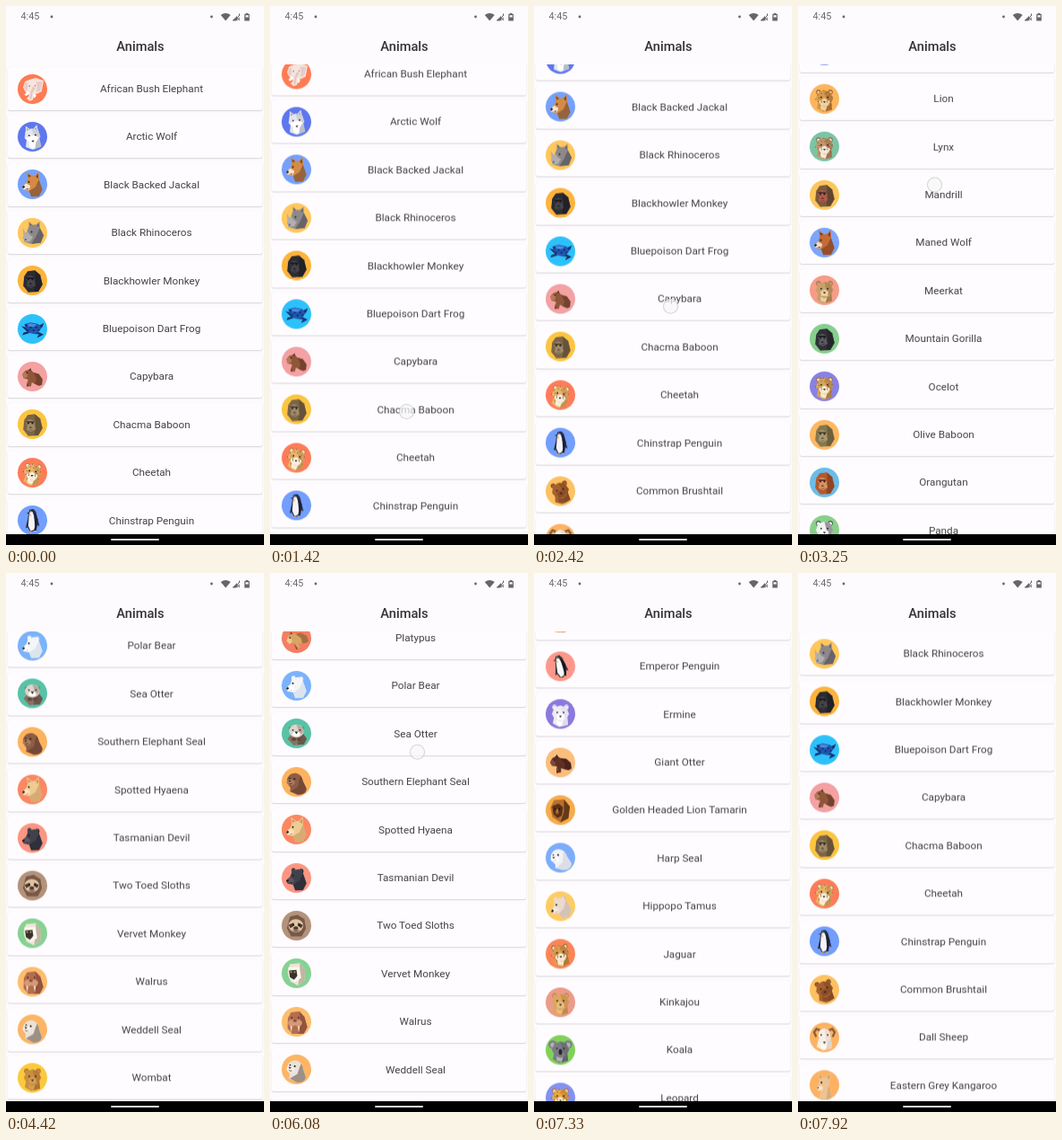
Recreate the animation shown at these times as an HTML page. Size 288 by 600 pixels, loop 8000 ms.

```html
<!DOCTYPE html>
<html lang="en">
<head>
<meta charset="utf-8">
<title>Animals</title>
<style>
html, body { margin: 0; width: 100%; height: 100%; overflow: hidden; background: #fdfbfe }
#stage { position: relative; width: 288px; height: 600px; overflow: hidden; font: 11.73px Roboto, sans-serif; color: #434346 }
#stage > * { position: absolute }
#clock { left: 16.5px; top: 4px; font-size: 10.8px; line-height: 16px; color: #6a696e }
#status { left: 0; top: 0 }
#title { left: 6px; width: 288px; top: 35px; line-height: 20px; text-align: center; font-size: 14.67px; font-weight: 500; color: #343338 }
#view { left: 0; top: 65px; width: 288px; height: 523px; overflow: hidden }
#list { position: absolute; left: 2px; top: 0; width: 284px; will-change: transform }
.card { position: absolute; width: 284px; height: 48px; border-radius: 2px; background: #fefcff; box-shadow: 0 1px 1.5px #00000026, 0 0 1px #00000018 }
.card svg { position: absolute; left: 11px; top: 7.5px; width: 33px; height: 33px; border-radius: 50% }
.card span { position: absolute; left: 37px; right: 0; line-height: 48px; text-align: center; white-space: nowrap }
#nav { left: 0; top: 588px; width: 288px; height: 12px; background: #000 }
#nav::after { content: ""; position: absolute; left: 117px; top: 5px; width: 54px; height: 2px; border-radius: 1px; background: #d8d8d8 }
#touch { left: -9px; top: -9px; width: 15px; height: 15px; border: 1.5px solid #c4c3c7b0; border-radius: 50%; background: #f8f8f8b8 }
</style>
</head>
<body>
<div id="stage">
  <div id="clock">4:45</div>
  <svg id="status" width="288" height="24" fill="#66656a">
    <circle cx="51" cy="12" r="1.4"/><circle cx="229.5" cy="12" r="1.4"/>
    <path d="M239.7 10Q245.2 5.8 250.7 10L245.2 16.6Z"/>
    <path d="M260.5 8.5V11M253 16H257L260 10.5M258.3 13L261 16M261 13L258.3 16" fill="none" stroke="#66656a"/>
    <path d="M253 16L258 11V16Z"/>
    <path d="M267.6 8h2.8v1h1.4v7.5h-5.6V9h1.4ZM267.4 10.2v2.3h3.2v-2.3Z" fill-rule="evenodd"/>
  </svg>
  <div id="title">Animals</div>
  <div id="view"><div id="list"></div></div>
  <div id="touch"></div>
  <div id="nav"></div>
</div>
<script>
const PITCH = 53.4, LOOP = 8000;

// name | shape | backdrop | fur | shade | light | tilt
const animals = `African Bush Elephant|elephant|ff7b53|f6e4de|d9b6ae|fff
Arctic Wolf|dog|5d77ee|e6e6ec|a9adbd|fff|-6
Black Backed Jackal|fox|75a1fb|d58a45|6d4a3a|f7e6d4
Black Rhinoceros|rhino|ffc75c|8d898b|676367|b3aeae
Blackhowler Monkey|ape|fdb33c|2b2b31|1c1c22|45444a
Bluepoison Dart Frog|frog|2dc1fb|1f56b0|16306b|4b8be0
Capybara|capybara|f4a1a3|8f5639|643a29|b57a55
Chacma Baboon|ape|fcc540|7b6547|57472f|a08a68
Cheetah|cat|ff7c59|e6b56c|b98348|fbeedd|8
Chinstrap Penguin|penguin|729efd|2b2f48|1d2036|f4f4f8
Common Brushtail|bear|fdc161|a5602e|71401f|8a4c28|-14
Dall Sheep|sheep|fdb263|f7efe6|dacbb9|fffaf2
Eastern Grey Kangaroo|roo|fdb263|ecc391|c79a68|f9e5c8
Emperor Penguin|penguin|fd978b|36343c|15151b|fafafa|-12
Ermine|bear|8a79de|f0ecf4|dcd6e6|fff
Giant Otter|capybara|fbbe7c|5e3024|3f1d17|7d4a38|-12
Golden Headed Lion Tamarin|tamarin|f6ac4b|5a3019|2c150b|b8702f
Harp Seal|seal|7cadfb|f1f2f5|cdd2dc|fff
Hippopo Tamus|profile|fdcc63|ead9cc|c9b4a8|f4e8dd|-14
Jaguar|cat|fb8559|daa04f|a26a2d|f8ead0|-8
Kinkajou|bear|ed9b89|dda760|b57e43|e8bd80
Koala|koala|80d159|7c7c84|5b5b64|b4b2ba
Leopard|cat|8391f2|e8a842|b9772a|fae7c4
Lion|cat|fdb65e|d49a4b|94582a|f1d29d
Lynx|cat|7bc4a4|c39468|8f6647|f6ead9
Mandrill|ape|fcc75a|7a5a3c|4f3a2b|b9584b
Maned Wolf|fox|7ba6fb|c46c38|7a3b24|f2dcc6
Meerkat|bear|f69c88|c9a06a|936d45|ead0a4
Mountain Gorilla|ape|86cf8c|303036|202026|5a5860
Ocelot|cat|8a82e2|d8a458|a36e35|f9ead0
Olive Baboon|ape|fdb860|86774f|5d5235|a99a70
Orangutan|ape|6bbce8|b5592c|7b371b|d79668
Panda|bear|89d08a|f2f2f2|2d2d33|fff
Patas Monkey|ape|fb8e66|c4743d|8b4c25|efd5bb
Pine Marten|bear|fcc75a|79492f|522e1f|efd49a
Platypus|capybara|f47d63|d9a562|8b5433|f2c991|-30
Polar Bear|profile|7bb2fc|f3f5f8|cdd9e6|fff
Sea Otter|otter|58c2a7|8a7160|5e4b41|ded5cb
Southern Elephant Seal|seal|fdb35e|8d5d45|643d30|ab7b5e|8
Spotted Hyaena|fox|fb8763|eecb92|c9965f|f9e2bb
Tasmanian Devil|profile|fc9583|41414c|25252f|5c5660
Two Toed Sloths|sloth|b3927b|785846|4f382d|dfc4a5
Vervet Monkey|vervet|86d293|ece5d7|b5ab97|fbf7ed
Walrus|walrus|fdbd6e|b46d4e|86493a|d49a78
Weddell Seal|seal|fdb565|eae2d8|6a5a52|f6efe7|14
Wombat|bear|fcc93c|c98e42|9b672d|d59f52`.split('\n').map(s => s.split('|'));

const path = (c, d, o = 1) => `<path fill="#${c}" opacity="${o}" d="${d}"/>`;
const oval = (c, x, y, rx, ry = rx) => `<ellipse fill="#${c}" cx="${x}" cy="${y}" rx="${rx}" ry="${ry}"/>`;
const pair = (c, x, y, rx, ry) => oval(c, -x, y, rx, ry) + oval(c, x, y, rx, ry);
const eyes = (x = 11, y = -5) => pair('1d1a1c', x, y, 3, 2.5);
const nose = y => path('241b1c', `M-5 ${y}H5L0 ${y + 6}Z`);
const head = (f, s) => path(f, 'M-20-22L0-29L20-22L29 0L18 20L0 27L-18 20L-29 0Z') +
  path(s, 'M0-29L20-22L29 0L18 20L8 4Z', .45);
const neck = (f, s, l) => path(f, 'M-20 5L-26 32L-4 44L26 36L22 0Z') +
  path(s, 'M22 0L26 36L4 43L10 15Z', .7) + path(l, 'M-14 18L-12 36L4 40L10 20Z');
// Head and shoulders turned to the left
const turned = (f, s, l) => path(f, 'M-15-22L6-30L22-17L34 18L22 41L-4 42L-11 23L-29 19L-35 9L-21-5Z') +
  path(s, 'M22-17L34 18L22 41L-4 42L-11 23L10 9Z', .6) + path(l, 'M-35 9L-21-4L-7 5L-11 18L-29 19Z') +
  oval('1d1a1c', -12, -8, 3) + path('241b1c', 'M-35 9L-29 4L-25 9L-31 14Z') + path(s, 'M-30 18L-13 13L-14 17Z');

const shapes = {
  dog: (f, s, l) => neck(f, s, l) + path(f, 'M-22-12L-19-38L-4-25ZM22-12L19-38L4-25Z') +
    path(s, 'M-18-19L-17-32L-8-25ZM18-19L17-32L8-25Z') +
    path(f, 'M-22-19L0-28L22-19L27 2L8 23H-8L-27 2Z') + path(s, 'M0-28L22-19L27 2L8 23L5-2Z', .4) +
    path(l, 'M-25 3L-6-3H6L22 4L7 23H-7Z') + eyes() + nose(13),
  fox: (f, s, l) => path(f, 'M-15-20L-20-42L0-28ZM6-26L21-43L23-14Z') + path(s, 'M-13-23L-16-35L-4-28ZM10-25L19-36L20-18Z') +
    turned(f, s, l),
  profile: (f, s, l) => oval(f, -10, -26, 7, 8) + oval(s, 16, -23, 8) + oval(f, 15, -24, 6) + turned(f, s, l),
  cat(f, s, l) {
    let spots = '';
    for (let i = 0; i < 18; i++) {
      const a = i * 2.4, r = 15 + i * .9;
      spots += oval('6a4024', Math.cos(a) * r, Math.sin(a) * r, 1.6);
    }
    return neck(f, s, l) + pair(s, 20, -23, 8) + pair(l, 20, -22, 5) + head(f, s) + spots +
      path(l, 'M-20 8L0-2L20 8L10 25H-10Z') + path('3a2318', 'M-11-3L-9 12L-11 12ZM11-3L9 12L11 12Z') + eyes() + nose(8);
  },
  bear: (f, s, l) => neck(f, s, l) + pair(s, 20, -23, 8) + pair(f, 20, -22, 6) + head(f, s) +
    path(l, 'M-14 5L0-3L14 5L10 20H-10Z') + eyes() + nose(6),
  koala: (f, s, l) => neck(f, s, l) + pair(f, 26, -18, 14) + pair(l, 26, -17, 8) + head(f, s) +
    eyes(12) + oval('29262b', 0, 7, 6, 10),
  otter: (f, s, l) => path(f, 'M-30 18L-14-2L22 0L35 18L25 37L-10 40Z') + path(s, 'M22 0L35 18L25 37L4 39L8 14Z', .7) +
    pair(f, 21, -18, 5) + oval(l, 0, -8, 25, 22) + path(s, 'M0-30Q26-24 24-5L12 8Z', .3) + eyes(12, -11) +
    oval('fff', 0, 2, 13, 8) + path('2a2122', 'M-6-6H6L0 2Z') + pair(s, 9, 20, 8, 6),
  seal: (f, s, l) => path(f, 'M-33-4Q-28-29-5-29Q15-27 22-5L37 18Q38 40 10 42L-18 35Q-13 23-25 15Z') +
    path(s, 'M10-22Q20-16 22-5L37 18Q38 40 10 42L-14 35L7 15Z', .6) + oval(l, -19, 4, 14, 10) +
    oval('221d20', -8, -9, 3.2) + oval('221d20', -24, -9, 2.5) + path('32272a', 'M-28-2H-18L-23 4Z') +
    path(s, 'M-26 9L-10 7L-19 12Z'),
  walrus: (f, s, l) => path(f, 'M-18-32L10-35L27-17L37 18L25 40L-14 41L-30 22L-29-12Z') +
    path(s, 'M10-35L27-17L37 18L25 40L4 41L14 8Z', .7) + path('fff4df', 'M-22 6H-14L-17 39ZM4 6H12L8 39Z') +
    oval(l, -15, 4, 13, 11) + oval(l, 6, 4, 13, 11) + oval('2a1c1a', -16, -14, 2.5) + oval('2a1c1a', 7, -14, 2.5) +
    oval(s, -5, -3, 6, 4),
  ape: (f, s, l) => path(f, 'M-16-31L8-34L26-19L34 14L20 38L-14 40L-31 18L-28-14Z') +
    path(s, 'M8-34L26-19L34 14L20 38L6 39L11 8Z', .6) +
    path(l, 'M-25-11L-7-17L8-10L7 5L11 17L-5 26L-20 19L-17 3Z') + path(s, 'M-25-11L8-10L5-4L-20-5Z') +
    oval('17161a', -14, -3, 3) + oval('17161a', 0, -3, 3) + path(s, 'M-13 11L-6 8L0 11L-6 14ZM-13 19H3L-5 21Z'),
  tamarin: (f, s, l) => path(l, 'M-22-33L12-36L32-12L27 28L0 42L-27 24L-34-8Z') + path(s, 'M12-36L32-12L27 28L0 42L12 6Z', .6) +
    path(f, 'M-28-14L-6-22L9-10L5 18L-10 27L-24 14Z') + oval('1b1110', -18, -4, 3) + oval('1b1110', -3, -4, 3) +
    path(l, 'M-14-4H-8L-6 12H-16Z'),
  vervet: (f, s, l) => path(f, 'M-22-31L12-34L29-12L27 26L6 42L-20 28L-30-4Z') +
    path(s, 'M12-34L29-12L27 26L6 42L10 10Z', .8) + path(l, 'M-28-20L10-22L16 16L-6 31L-26 14Z') +
    path('35322f', 'M-25-9L0-11L3 9L-8 22L-22 14Z') + oval('c99a4f', -18, -4, 3) + oval('c99a4f', -6, -4, 3),
  sloth: (f, s, l) => path(f, 'M-22-30L4-36L27-22L32 10L18 36L-18 36L-32 8Z') +
    oval(l, -2, 0, 25, 22) + path(s, 'M-27-2L-10-10L-7 0L-20 8ZM22-2L6-10L4 0L16 8Z') +
    pair('171316', 10, -3, 3) + oval(s, -2, 8, 8, 6) + path(s, 'M-15 13Q-2 27 12 13Q-2 19-15 13'),
  elephant: (f, s, l) => path(f, 'M-10-32L12-38L38-28L31 8L14 17L-4 10L-22 12L-32-6L-25-26Z') +
    path(s, 'M12-25L34-25L27 5L13 10ZM-14-20L-27-22L-28-3L-18 6Z', .5) +
    path(f, 'M-14-28L10-31L16-3L5 16L2 36L-10 40L-20 31L-13 25L-10 10L-17-2Z') +
    path(s, 'M2-10L10-3L0 13L-3 34L-10 34L-6 9Z', .6) + path(l, 'M7 10L13 23L6 31L2 24ZM-15 6L-28 20L-20 23L-9 15Z') +
    oval('5c4641', -10, -10, 2) + oval('5c4641', 9, -11, 2),
  rhino: (f, s, l) => path(f, 'M-12-22L-12-38L0-27L12-27L24-38L25-17L38 8L28 34L-4 37L-27 31L-31 15L-19-3Z') +
    path(s, 'M25-17L38 8L28 34L-4 37L12 13ZM-9-25L-9-33L-2-26ZM15-24L22-32L22-18Z') +
    path(l, 'M-30 14L-33-15L-20 4L-18-8L-10 6L2 14L-8 29L-27 31Z') + oval('29262a', -3, -3, 3) + oval('29262a', -23, 23, 2.5),
  frog: (f, s, l) => path(s, 'M-38-10L-20-5L-5 12L-34 21L-30 12L-18 9ZM8 4L38 19L16 30L19 22L24 19L2 15ZM18-10L39-20L33-5L17 0Z') +
    path(f, 'M-28-16L-6-22L20-17L31-2L12 18L-13 13Z') + path(l, 'M-18-15L-7-19L14-15L7-8L-9-6Z') +
    [-15, -6, 4, 13, 21].map((x, i) => oval(s, x, i % 2 ? -5 : 4, 3.6)).join('') + oval('0d1733', -21, -12, 3),
  capybara: (f, s, l) => path(f, 'M-34-8L-24-20L-8-24L4-14L22-8L34 9L32 28L22 31L8 25L-2 20L-5 33H-13L-15 10L-30 5Z') +
    path(s, 'M4-14L22-8L34 9L32 28L22 31L8 25L14 8Z', .65) + path(l, 'M-34-8L-24-16L-16-8L-18 3L-30 5Z') +
    path(s, 'M-14-21L-6-29L-3-18ZM-16 11L-13 33L-20 33Z') + oval('22171a', -18, -12, 2.5),
  penguin: (f, s, l) => path(f, 'M-9-36L4-38L12-28L18-4L24 20L16 16L13 35L-8 39L-16 24L-23 26L-16-4L-13-26Z') +
    path(l, 'M-10-27L0-29L5-16L11 13L5 32L-6 36L-14 19L-12-9Z') + path(s, 'M5-26L12-18L18-4L13 35L9 31Z') +
    path('f2b04e', 'M-13-17L-7-23L-4-14ZM-13 37H-3L-6 42ZM3 35H14L10 40Z') + path(f, 'M-10-27L-21-24L-10-21Z') + oval(l, -5, -31, 1.7),
  sheep: (f, s, l) => neck(f, s, l) + path('8b6038', 'M-10-26L-28-33L-39-18L-31 0L-24-4L-31-17L-25-24L-12-17ZM10-26L28-33L39-18L31 0L24-4L31-17L25-24L12-17Z') +
    path(f, 'M-16-24L0-31L16-24L21-6L9 24H-9L-21-6Z') + path(s, 'M0-31L16-24L21-6L9 24L4 0Z', .45) + eyes(11, -8) + nose(15),
  roo: (f, s, l) => path(f, 'M-10 8L-20 50H26L14-4Z') + path(s, 'M14-4L26 50H6Z', .5) +
    path(f, 'M-15-17L-22-44L-4-26ZM6-25L22-43L19-15Z') + path(s, 'M-14-21L-18-36L-8-25ZM9-24L19-36L16-19Z') +
    path(f, 'M-16-22L4-27L19-17L16 6L-4 18L-22 18L-25 8Z') + path(l, 'M-25 8L-12 1L-4 9L-8 18H-22Z') +
    oval('1d1a1c', -10, -8, 3) + path('3d2a22', 'M-25 8L-18 7L-22 13Z')
};

const list = document.getElementById('list'), touch = document.getElementById('touch');
list.innerHTML = animals.map(([name, kind, bg, f, s, l, tilt = 0], i) =>
  `<div class="card" style="top:${3 + i * PITCH}px"><svg viewBox="-50 -50 100 100" style="background:#${bg}">` +
  `<g transform="rotate(${tilt})">${shapes[kind](f, s, l)}</g></svg><span>${name}</span></div>`).join('');

// Smooth monotone curve through [time, value] points
function curve(keys, t) {
  const n = keys.length - 1;
  const i = Math.max(0, keys.findLastIndex(k => k[0] <= t));
  if (i >= n) return keys[n][1];
  if (t < keys[0][0]) return keys[0][1];
  const rate = j => (keys[j + 1][1] - keys[j][1]) / (keys[j + 1][0] - keys[j][0]);
  const slope = j => {
    if (j === 0) return rate(0);
    if (j === n) return rate(n - 1);
    const a = rate(j - 1), b = rate(j);
    return a * b > 0 ? 2 * a * b / (a + b) : 0;
  };
  const [t0, a] = keys[i], [t1, b] = keys[i + 1], h = t1 - t0, u = (t - t0) / h, v = 1 - u;
  return v * v * ((1 + 2 * u) * a + u * h * slope(i)) + u * u * ((1 + 2 * v) * b - v * h * slope(i + 1));
}

const end = PITCH * (animals.length - 1) - 469.5;
const scroll = [[0, 0], [1200, 0], [1420, 16.5], [2420, 86.3], [2640, 390], [3130, 1010], [3330, 1350], [3640, 1760],
  [3980, end], [5450, end], [6080, end - 44.4], [6260, end - 210], [6400, end - 390], [7330, 683.5], [7920, 163.4], [8000, 103]];
const drags = [
  { x: 153, y: [[1150, 470], [1420, 452], [2420, 335], [2640, 8]] },
  { x: 153, y: [[3130, 410], [3330, 62]] },
  { x: 165, y: [[5450, 155], [6080, 199.5], [6260, 365], [6400, 545]] }
];

function draw(now) {
  const t = now % LOOP;
  list.style.transform = `translateY(${-curve(scroll, t)}px)`;
  const drag = drags.find(({ y }) => t >= y[0][0] && t <= y.at(-1)[0]);
  touch.style.visibility = drag ? 'visible' : 'hidden';
  if (drag) touch.style.transform = `translate(${drag.x}px,${curve(drag.y, t)}px)`;
}
function frame() {
  draw(performance.now());
  requestAnimationFrame(frame);
}
frame();
</script>
</body>
</html>
```
